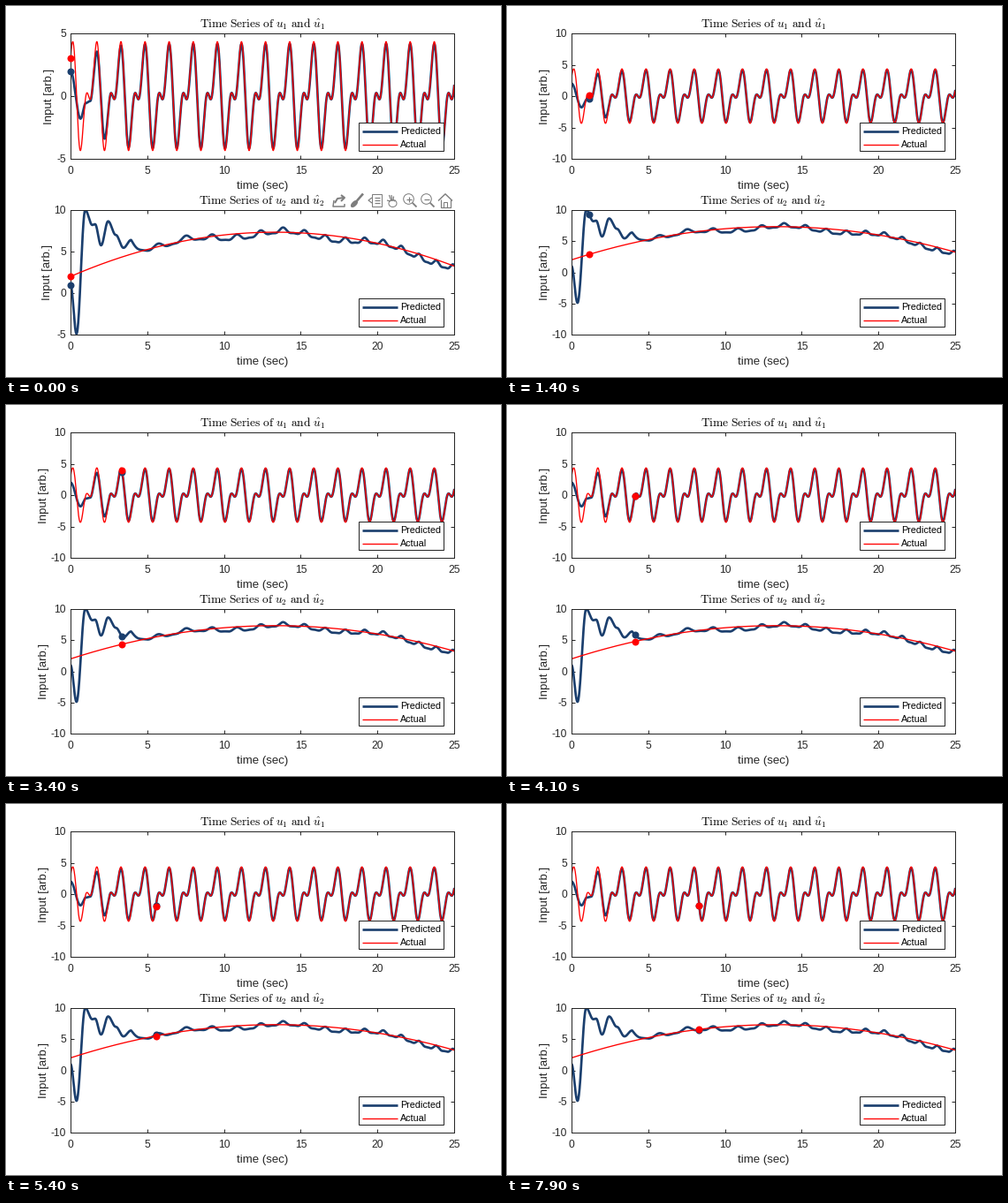
Animation, 560 px wide and 420 px high, one loop 8 s. Source, as a matplotlib script:

```python
import numpy as np
import matplotlib.pyplot as plt
from matplotlib.animation import FuncAnimation
from matplotlib.patches import Circle, Ellipse, Rectangle

plt.rcParams["font.family"] = "Liberation Sans"
plt.rcParams["mathtext.fontset"] = "cm"

W, H = 560, 420
FRAMES, INTERVAL = 80, 100
LEFT, RIGHT, T_END = 73, 507, 25
NAVY, RED, DARK, GRAY = "#1b3f6e", "#ff0000", "#262626", "#7d7d7d"
PT = 0.72  # points per pixel at 100 dpi


def ease_through(t, pts):
    """Cosine interpolation through turning points."""
    x, y = np.array(pts, float).T
    k = np.clip(np.searchsorted(x, t, side="right") - 1, 0, len(x) - 2)
    s = np.clip((t - x[k]) / (x[k + 1] - x[k]), 0, 1)
    return y[k] + (y[k + 1] - y[k]) * (1 - np.cos(np.pi * s)) / 2


def actual1(t):
    return 3 * np.cos(4 * t) + 2 * np.sin(8 * t)


def actual2(t):
    return 2 + 0.8 * t - 0.03 * t ** 2


# the estimates start off wildly, then settle on the actual inputs
START1 = [(0, 2), (0.65, -1.8), (1.0, -0.55), (1.28, -0.4),
          (1.72, 3.55), (2.22, -3.4), (2.648, 0.25)]
START2 = [(0, 1), (0.39, -4.9), (0.96, 10), (1.42, 8.2), (1.6, 8.3),
          (1.99, 5.75), (2.45, 8.65), (2.95, 7), (3.45, 5.45), (3.95, 6.4)]


def predicted1(t):
    late = (0.96 - 0.06 * np.exp(2.65 - t)) * actual1(t)
    return np.where(t < START1[-1][0], ease_through(t, START1), late)


def rippled2(t):
    d = t - 3.95
    phase = 2 * np.pi * (0.1 + 0.494 * d + 0.0103 * d ** 2)
    drift = 0.33 * np.cos(2 * np.pi * (t - 14) / 6.4) - 0.17
    return actual2(t) + drift + 0.3 * np.cos(phase) + 0.12 * np.cos(2 * phase)


def predicted2(t):
    t0, v0 = START2[-1]
    late = rippled2(t) + (v0 - rippled2(t0)) * np.exp((t0 - t) / 0.8)
    return np.where(t < t0, ease_through(t, START2), late)


def marker_time(i):
    """Constant speed after a soft start."""
    return 0.1103 * np.log1p(np.exp(i - 3.6)) if i else 0.0


fig = plt.figure(figsize=(5.6, 4.2), dpi=100, facecolor="white")
px = fig.add_axes([0, 0, 1, 1], zorder=5)
px.set(xlim=(0, W), ylim=(H, 0))
px.axis("off")


def label(x, y, s, size, color=DARK, ha="center", **kw):
    return px.text(x, y, s, fontsize=size * PT, color=color, ha=ha,
                   va="baseline", **kw)


def stroke(xs, ys, color=GRAY, lw=1.2):
    return px.plot(xs, ys, color=color, lw=lw * PT, solid_capstyle="butt")[0]


class Panel:
    def __init__(self, top, bottom, n, predicted, actual, first_ticks):
        self.top, self.bottom = top, bottom
        self.curves = predicted, actual
        ax = self.ax = fig.add_axes([LEFT / W, 1 - bottom / H,
                                     (RIGHT - LEFT) / W, (bottom - top) / H])
        ax.set_xlim(0, T_END)
        ax.set_xticks(range(0, 26, 5))
        ax.tick_params(direction="in", length=4.3 * PT, width=PT, color=DARK,
                       top=True, right=True, labelbottom=False, labelleft=False)
        for spine in ax.spines.values():
            spine.set(color=DARK, linewidth=PT)

        t = np.linspace(0, T_END, 3000)
        self.dots = []
        for f, color, lw, z in ((predicted, NAVY, 2.67, 2), (actual, RED, 1.33, 2.1)):
            ax.plot(t, f(t), color=color, lw=lw * PT, zorder=z)
            self.dots += ax.plot([], [], "o", color=color, ms=8 * PT, mew=0,
                                 clip_on=False, zorder=z + 4)

        for v in range(0, 26, 5):
            label(LEFT + v * (RIGHT - LEFT) / T_END, bottom + 17.4, str(v), 12)
        mid = (LEFT + RIGHT) / 2
        label(mid, bottom + 34, "time (sec)", 13.2)
        label(mid, top - 6.4, rf"$\mathrm{{Time\ Series\ of\ }}u_{n}"
              rf"\mathrm{{\ and\ }}\hat{{u}}_{n}$", 13.35, "black")
        self.legend(bottom - 41)
        self.scales = [self.scale(first_ticks, 52 if n == 1 else 50),
                       self.scale(range(-10, 11, 5), 46)]

    def legend(self, y):
        px.add_patch(Rectangle((399, y), 96, 32, fc="white", ec=DARK, lw=PT))
        rows = ((9.5, "Predicted", NAVY, 2.67), (24.5, "Actual", RED, 1.33))
        for dy, name, color, lw in rows:
            stroke([402.5, 442.5], [y + dy, y + dy], color, lw)
            label(446, y + dy + 3.8, name, 10.8, "black", "left")

    def scale(self, ticks, label_x):
        lo, hi = min(ticks), max(ticks)
        unit = (self.bottom - self.top) / (hi - lo)
        texts = [label(68, self.bottom - (v - lo) * unit + 4.2, str(v), 12, ha="right")
                 for v in ticks]
        texts.append(label(label_x, (self.top + self.bottom) / 2, "Input [arb.]", 13.2,
                           rotation=90, rotation_mode="anchor"))
        return list(ticks), texts

    def update(self, t, wide):
        for k, (_, texts) in enumerate(self.scales):
            for text in texts:
                text.set_visible(k == wide)
        ticks = self.scales[wide][0]
        self.ax.set_ylim(ticks[0], ticks[-1])
        self.ax.set_yticks(ticks)
        for dot, f in zip(self.dots, self.curves):
            dot.set_data([t], [float(f(np.float64(t)))])


def make_toolbar(y=220):
    parts = []

    def line(x, dx, dy, lw=1.2):
        parts.append(stroke(x + np.array(dx), y + np.array(dy), lw=lw))

    def patch(shape, x, dy, *size, fill=False, **kw):
        fc = GRAY if fill else "none"
        parts.append(px.add_patch(shape((x, y + dy), *size, fc=fc, ec=GRAY, lw=PT, **kw)))

    # export
    line(376, [-5, -6, 7, 7], [0, 7, 7, 4], 1.5)
    line(376, [-4, -1, 6], [3, -2, -3], 2)
    line(376, [3, 7, 3], [-6, -3, 1], 2)
    # brush
    line(397, [7, 0], [-7.5, 0.5], 2.6)
    patch(Ellipse, 394, 4, 9, 4.5, angle=-45, fill=True)
    # data tip
    patch(Rectangle, 414, -7, 11, 14)
    line(414, [0, -4, 0], [-3, 0, 3])
    for dy in (-3, 0, 3):
        line(416.5, [0, 6], [dy, dy])
    # hand
    patch(Ellipse, 437.5, 3.5, 9, 8)
    for k in range(5):
        line(437, [k - 2, 2.5 * k - 6], [1, -6 + 1.5 * (k - 2) ** 2 * (k != 1)])
    # zoom in and out
    for x in (455.5, 475.5):
        patch(Circle, x, -1.5, 5.8)
        line(x, [4.3, 9], [2.8, 7.5], 1.8)
        line(x, [-3, 3], [-1.5, -1.5])
    line(455.5, [0, 0], [-4.5, 1.5])
    # home
    line(497, [-8, 0, 8], [0.5, -7.2, 0.5], 1.4)
    line(497, [-5.5, -5.5, 5.5, 5.5], [-1, 7.5, 7.5, -1])
    patch(Rectangle, 495.3, 2, 3.5, 5.5)
    return parts


panels = [Panel(31, 173, 1, predicted1, actual1, range(-5, 6, 5)),
          Panel(231, 372, 2, predicted2, actual2, range(-5, 11, 5))]
toolbar = make_toolbar()


def update(i):
    for panel in panels:
        panel.update(marker_time(i), int(i > 0))
    for part in toolbar:
        part.set_visible(i < 11)


anim = FuncAnimation(fig, update, frames=FRAMES, interval=INTERVAL,
                     init_func=lambda: update(0), repeat=True, repeat_delay=0,
                     blit=False)
plt.show()
```
